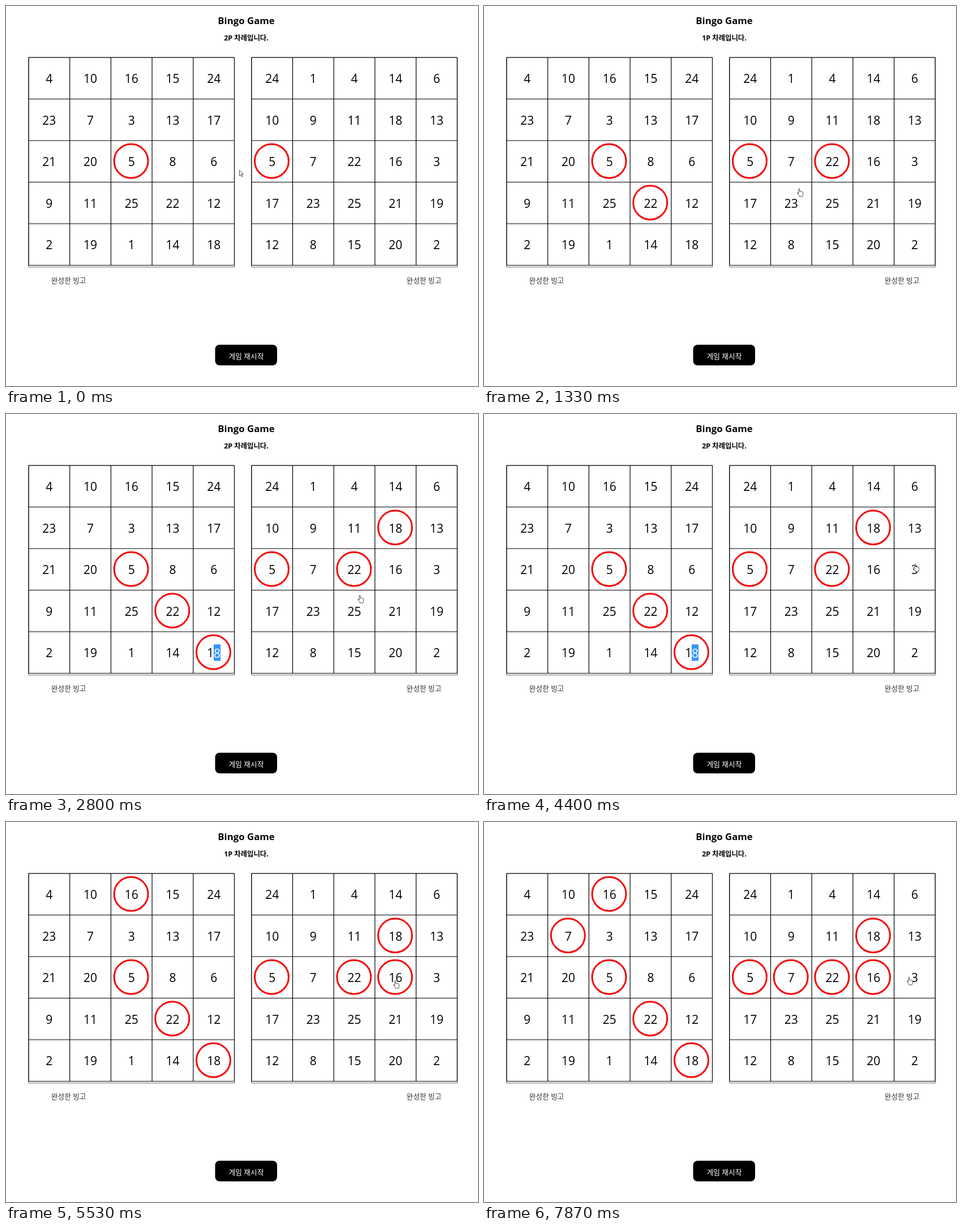
Recreate the animation shown at these times as an HTML page. Size 834 by 672 pixels, loop 8 s.

```html
<!DOCTYPE html>
<html lang="ko">
<head>
<meta charset="utf-8">
<title>Bingo Game</title>
<style>
  html, body { margin: 0; width: 100%; height: 100%; overflow: hidden; background: #fff; }
  svg { display: block; width: 834px; height: 672px; }
  text { font-family: "Open Sans", "Noto Sans CJK KR", "Noto Sans CJK", sans-serif; text-anchor: middle; }
  .title { font-size: 16.8px; font-weight: 700; }
  .turn { font-size: 12.4px; font-weight: 700; }
  .label { font-size: 12.7px; fill: #333; }
  .number { font-size: 21px; }
  .line { fill: none; stroke: #000; stroke-width: 1.2; }
  .frame { fill: none; stroke: #666; stroke-width: 1; }
  .ring { fill: none; stroke: #f40808; stroke-width: 3; }
  .cursor { fill: #fff; stroke: #222; stroke-width: .8; stroke-linejoin: round; }
</style>
</head>
<body>
<svg viewBox="0 0 834 672">
  <text class="title" x="424.5" y="32">Bingo Game</text>
  <text class="turn" id="turn" x="424.5" y="61"></text>
  <g id="boards"></g>
  <text class="label" x="110.7" y="489.5">완성한 빙고</text>
  <text class="label" x="738.6" y="489.5">완성한 빙고</text>
  <rect x="369.5" y="599" width="109.5" height="36.5" rx="8"/>
  <text class="label" x="424.5" y="623.5" style="fill:#fff">게임 재시작</text>
  <g id="selection">
    <rect x="367" y="407.5" width="12" height="29" fill="#3296fb"/>
    <text class="number" x="373" y="430.5" fill="#fff">8</text>
  </g>
  <g id="pointer" class="cursor">
    <path id="arrow" d="M-2.5-7v9.7l2.3-2.1 1.6 3.8 1.6-.7-1.6-3.7h3.1z"/>
    <path id="hand" d="M-3.2 1.5V-5.6a1 1 0 0 1 2 0v4q1-.8 2 .2 1.2-.6 2 .4 1.4-.4 1.7.9V3q0 1.8-1.2 3.2V7H-2V6q-.8-1.4-2-2.6L-5.2.9q-.3-1.4 1-.9z"/>
  </g>
</svg>
<script>
const LOOP = 8000, STEP = 200 / 3;
const CELL_W = 72.7, CELL_H = 73.5, TOP = 91;

const boards = [
  { x: 40, rows: ["4 10 16 15 24", "23 7 3 13 17", "21 20 5 8 6", "9 11 25 22 12", "2 19 1 14 18"] },
  { x: 433.8, rows: ["24 1 4 14 6", "10 9 11 18 13", "5 7 22 16 3", "17 23 25 21 19", "12 8 15 20 2"] }
];

// Each pick rings its number on both boards and passes the turn.
const picks = [
  { number: 5, at: 0 },
  { number: 22, at: 800 },
  { number: 18, at: 2267 },
  { number: 16, at: 5533 },
  { number: 7, at: 6800 }
];

// The pointer runs along each path at a steady speed and rests in between.
const moves = [
  { from: 133, to: 660, path: "M415 297.5L625 288" },
  { from: 800, to: 2000, path: "M625 288L707 283 320 405 357 430" },
  { from: 2200, to: 2533, path: "M357 430L513 371" },
  { from: 2667, to: 3000, path: "M513 371L797 262" },
  { from: 4333, to: 5333, path: "M797 262L765 271 700 329 636 240 680 143 711 289 689 287" },
  { from: 5533, to: 6333, path: "M689 287L773 311 130 210" },
  { from: 6333, to: 6660, path: "M130 210L118 205 155 202" },
  { from: 6800, to: 7000, path: "M155 202L274 227" },
  { from: 7133, to: 7860, path: "M274 227L822 327 753 281" }
];
const selected = { from: 2200, to: 5333 };

const byId = id => document.getElementById(id);

function make(tag, attrs, content = "") {
  const node = document.createElementNS("http://www.w3.org/2000/svg", tag);
  for (const key in attrs) node.setAttribute(key, attrs[key]);
  node.textContent = content;
  return node;
}

const show = (node, visible) => node.setAttribute("visibility", visible ? "visible" : "hidden");

function drawBoard({ x, rows }) {
  const group = byId("boards");
  const width = CELL_W * 5, height = CELL_H * 5;
  let lines = "";
  for (let i = 0; i <= 5; i++) {
    lines += `M${x + i * CELL_W} ${TOP}v${height}M${x} ${TOP + i * CELL_H}h${width}`;
  }
  group.append(
    make("rect", { class: "frame", x, y: TOP, width, height: height + 3 }),
    make("path", { class: "line", d: lines })
  );
  rows.forEach((row, r) => row.split(" ").forEach((number, c) => {
    const cx = x + CELL_W * (c + .5), cy = TOP + CELL_H * (r + .5);
    group.append(make("text", { class: "number", x: cx, y: cy + 8.6 }, number));
    const pick = picks.find(p => p.number === +number);
    if (!pick) return;
    const ring = make("circle", { class: "ring", cx: cx - .7, cy: cy - .6, r: 30 });
    pick.rings.push(ring);
    group.append(ring);
  }));
}

function pointerAt(t) {
  const { from, to, line } = moves.findLast(m => t >= m.from) || moves[0];
  const progress = Math.min(1, Math.max(0, (t - from) / (to - from)));
  return line.getPointAtLength(progress * line.getTotalLength());
}

function render(time) {
  // The screen refreshes 15 times a second.
  const t = Math.floor(((time + 4) % LOOP) / STEP) * STEP + 1;
  const done = picks.filter(p => t >= p.at);
  picks.forEach(p => p.rings.forEach(ring => show(ring, done.includes(p))));
  byId("turn").textContent = `${done.length % 2 ? "2P" : "1P"} 차례입니다.`;
  show(byId("selection"), t >= selected.from && t < selected.to);

  const { x, y } = pointerAt(t), tip = x - 2.5;
  const overBoard = boards.some(b => tip > b.x && tip < b.x + CELL_W * 5);
  byId("pointer").setAttribute("transform", `translate(${x} ${y})`);
  show(byId("hand"), overBoard);
  show(byId("arrow"), !overBoard);
}

picks.forEach(p => p.rings = []);
moves.forEach(m => m.line = make("path", { d: m.path }));
boards.forEach(drawBoard);

const start = performance.now();
function tick() {
  render(performance.now() - start);
  requestAnimationFrame(tick);
}
tick();
</script>
</body>
</html>
```
